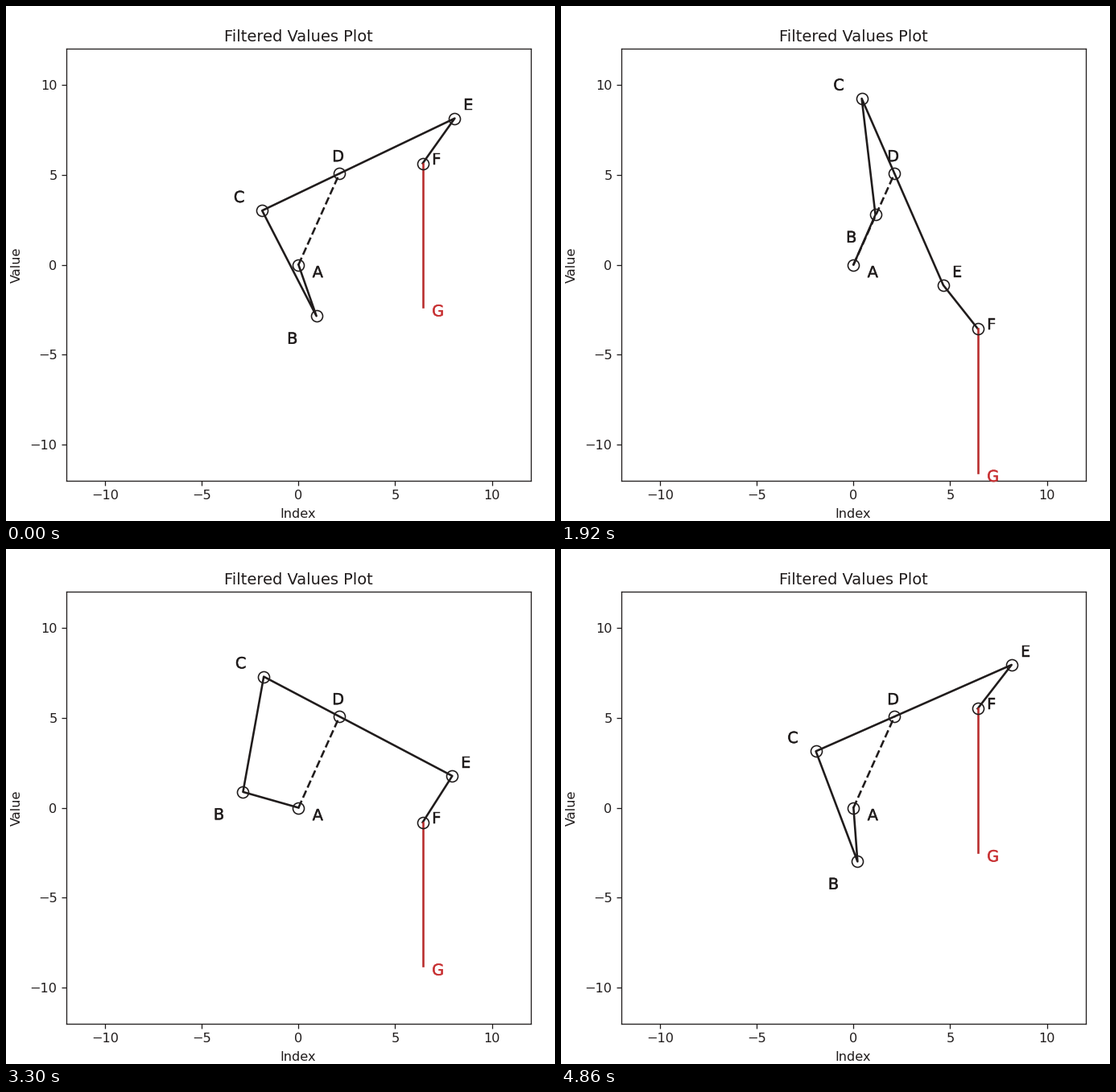
These frames come from a looping animation (682x640 px, 4.92 s). A matplotlib script:

```python
import numpy as np
import matplotlib.pyplot as plt
from matplotlib.animation import FuncAnimation
from matplotlib.patheffects import withStroke

W, H, DPI = 682, 640, 100
FRAMES, STEP_MS = 82, 60
K = 1.163                      # enlargement of the default plot style
INK, RED, RED_TEXT = "#201c1c", "#b82c2c", "#c83234"

# Linkage dimensions in data units
D = np.array([2.12, 5.07])
AB, BC, CD, DE, EF, FG = 3.0, 6.5, 4.5, 6.7, 3.0, 8.0
SLIDE_X = 6.42

# Crank angle in degrees, slightly uneven over the loop
KEY_FRAMES = [0, 15, 24, 40, 55, 70, 81]
KEY_ANGLES = [-72, -7, 33.6, 102, 163, 227.7, 274]

# Label offsets from their joints
OFFSETS = {"A": (0.72, -0.7), "B": (-1.52, -1.54), "C": (-1.47, 0.46),
           "D": (-0.38, 0.67), "E": (0.46, 0.46), "F": (0.48, -0.05),
           "G": (0.48, -0.5)}

plt.rcParams.update({
    "font.family": "DejaVu Sans", "font.size": 10 * K,
    "text.color": INK, "axes.edgecolor": INK,
    "xtick.color": INK, "ytick.color": INK,
    "axes.linewidth": 0.8 * K, "lines.linewidth": 1.6 * K,
})
for axis in ("xtick", "ytick"):
    plt.rcParams.update({f"{axis}.major.size": 3.5 * K,
                         f"{axis}.major.width": 0.8 * K,
                         f"{axis}.major.pad": 3.5 * K})


def meet(p, rp, q, rq):
    """Intersection of two circles on the left of the line p to q."""
    d = q - p
    dist = np.hypot(*d)
    u = d / dist
    along = (rp**2 - rq**2 + dist**2) / (2 * dist)
    side = np.sqrt(rp**2 - along**2)
    return p + along * u + side * np.array([-u[1], u[0]])


def solve(angle):
    """Positions of all joints for a crank angle in radians."""
    a = np.zeros(2)
    b = AB * np.array([np.cos(angle), np.sin(angle)])
    c = meet(b, BC, D, CD)
    e = D + (D - c) * DE / CD
    f = np.array([SLIDE_X, e[1] - np.sqrt(EF**2 - (e[0] - SLIDE_X)**2)])
    g = f - [0, FG]
    return dict(zip("ABCDEFG", (a, b, c, D, e, f, g)))


fig = plt.figure(figsize=(W / DPI, H / DPI), dpi=DPI, facecolor="white")
left, right, top, bottom = 75, 651.7, 53.3, 589.7
ax = fig.add_axes([left / W, 1 - bottom / H,
                   (right - left) / W, (bottom - top) / H])
ax.set(xlim=(-12, 12), ylim=(-12, 12))
ax.set_xticks(range(-10, 11, 5))
ax.set_yticks(range(-10, 11, 5))
ax.set_title("Filtered Values Plot", fontsize=12 * K, pad=5.8 * K)
fig.text(362.8 / W, 1 - 635.5 / H, "Index", ha="center", va="baseline")
fig.text(17.8 / W, 1 - 321.5 / H, "Value", ha="center", va="baseline",
         rotation=90, rotation_mode="anchor")

ax.plot([0, D[0]], [0, D[1]], "--", color=INK)
rods, = ax.plot([], [], color=INK)
slider, = ax.plot([], [], color=RED)
joints, = ax.plot([], [], "o", color=INK, mfc="none", ms=10.1, mew=K)

labels = {}
for name in OFFSETS:
    color = RED_TEXT if name == "G" else INK
    labels[name] = ax.text(0, 0, name, fontsize=12 * K, color=color,
                           path_effects=[withStroke(linewidth=0.3,
                                                    foreground=color)])


def update(i):
    angle = np.radians(np.interp(i, KEY_FRAMES, KEY_ANGLES))
    pts = solve(angle)
    for line, names in ((rods, "ABCDEF"), (slider, "FG"), (joints, "ABCDEF")):
        line.set_data(*np.array([pts[n] for n in names]).T)
    for name, text in labels.items():
        text.set_position(pts[name] + OFFSETS[name])
    return [rods, slider, joints, *labels.values()]


anim = FuncAnimation(fig, update, frames=FRAMES, interval=STEP_MS,
                     repeat=True, repeat_delay=0, blit=False)
plt.show()
```
